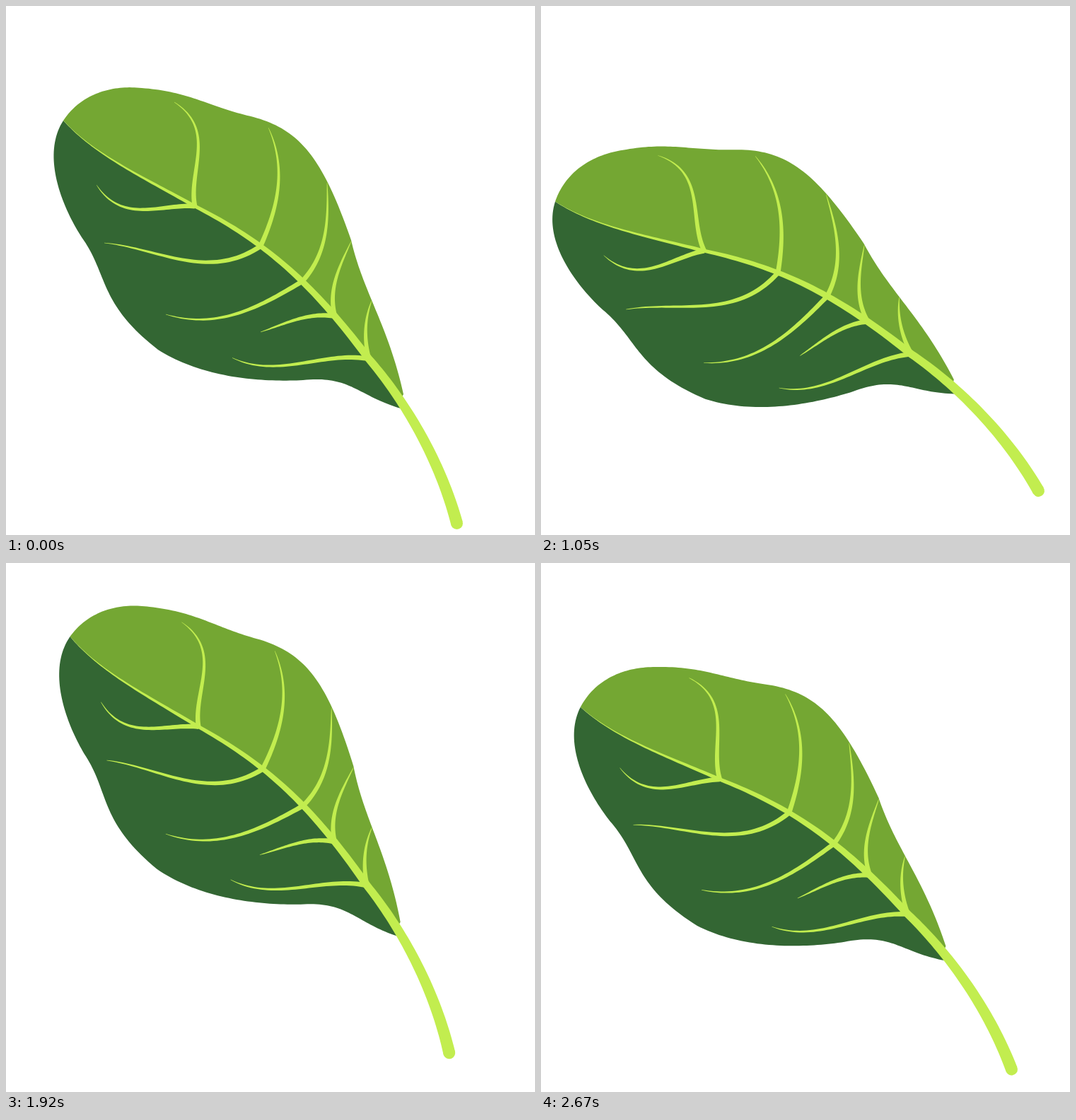
Animation, 748 px wide and 748 px high, one loop 2700 ms. Source, as an HTML page with a canvas:

```html
<!DOCTYPE html>
<html lang="en">
<head>
<meta charset="utf-8">
<title>Drifting leaf</title>
<style>
  html, body { margin: 0; width: 100%; height: 100%; overflow: hidden; background: #fff; }
  canvas { display: block; }
</style>
</head>
<body>
<canvas id="stage" width="748" height="748"></canvas>
<script>
const ctx = document.getElementById('stage').getContext('2d');
const LIGHT = '#74a733', DARK = '#336633', LIME = '#c2ed4f';
const LOOP = 2700, STEP = 30, SWAY = 1402;
const PIVOT = { x: 304.5, y: 430 };
const DETAIL = 40;

const mix = (a, b, u) => a + (b - a) * u;

// Samples a chain of cubic Béziers: a start point, then six numbers per piece.
function chain(start, ...pieces) {
  const line = [start];
  let [x0, y0] = start;
  for (const [x1, y1, x2, y2, x3, y3] of pieces) {
    for (let k = 1; k <= DETAIL; k++) {
      const u = k / DETAIL, v = 1 - u;
      const at = (a, b, c, d) => a * v ** 3 + 3 * b * u * v * v + 3 * c * u * u * v + d * u ** 3;
      line.push([at(x0, x1, x2, x3), at(y0, y1, y2, y3)]);
    }
    [x0, y0] = [x3, y3];
  }
  return line;
}

function polygon(points) {
  const path = new Path2D();
  points.forEach(([x, y]) => path.lineTo(x, y));
  path.closePath();
  return path;
}

// Outline around a line; widthAt gets the progress from 0 to 1.
function ribbon(line, widthAt) {
  const last = line.length - 1, left = [], right = [];
  line.forEach(([x, y], i) => {
    const p = line[Math.max(i - 1, 0)], q = line[Math.min(i + 1, last)];
    const scale = widthAt(i / last) / 2 / Math.hypot(q[0] - p[0], q[1] - p[1]);
    const nx = (p[1] - q[1]) * scale, ny = (q[0] - p[0]) * scale;
    left.push([x + nx, y + ny]);
    right.unshift([x - nx, y - ny]);
  });
  return polygon([...left, ...right]);
}

const rib = chain([81, 162],
  [125, 210, 190, 240, 267, 283],
  [365, 333, 430, 388, 513, 499],
  [563, 557, 613, 640, 637.5, 731.5]);
const ribAt = t => rib[Math.round(t * DETAIL)];
const bladeRib = rib.slice(0, 2.3 * DETAIL + 1).reverse();

const upper = chain([81, 162],
  [104, 127, 145, 111, 192, 116],
  [260, 121, 285, 142, 350, 157],
  [415, 175, 447, 213, 488, 331],
  [505, 405, 540, 450, 562, 549]);
const lower = chain([81, 162],
  [50, 210, 78, 282, 107, 327],
  [145, 380, 130, 420, 215, 486],
  [278, 526, 360, 532, 420, 529],
  [487, 522, 497, 551, 558, 569]);

// A vein leaves the rib at t and bows sideways near its root and near its tip.
function vein(t, tipX, tipY, rootBow, tipBow) {
  const [x, y] = ribAt(t);
  const dx = tipX - x, dy = tipY - y, len = Math.hypot(dx, dy);
  const control = (u, bow) => [x + dx * u - dy / len * bow, y + dy * u + dx / len * bow];
  const line = chain([x, y], [...control(1 / 3, rootBow), ...control(2 / 3, tipBow), tipX, tipY]);
  return ribbon(line, u => 0.4 + 6.4 * (1 - u) ** 0.7);
}

const lightHalf = polygon([...upper, ...bladeRib]);
const darkHalf = polygon([...lower, ...bladeRib]);
const stalk = ribbon(rib, u => 17 * u ** 1.1);
const stalkEnd = new Path2D();
stalkEnd.arc(...rib[rib.length - 1], 8.5, 0, 2 * Math.PI);

const veins = [
  vein(1, 238, 136, 0, 52), vein(1, 128, 253, -7, -47),
  vein(1.36, 371, 172, 21, 30), vein(1.36, 139, 335, -52, -5),
  vein(1.6, 454, 250, 26, 14), vein(1.6, 226, 436, -21, -39),
  vein(1.8, 488, 333, -18, -8), vein(1.8, 360, 461, 14, 4),
  vein(2, 517, 417, -8, -9), vein(2, 320, 497.5, 11, -30)
];

// Linear keys: share of the sway, turn in degrees, vertical shift.
const keys = [[0, 0, 0], [0.33, 5, -66], [0.66, -20, 66], [1, 0, 0]];

function pose(time) {
  const share = time % SWAY / SWAY;
  const next = keys.findIndex(key => share < key[0]);
  const a = keys[next - 1], b = keys[next];
  const u = (share - a[0]) / (b[0] - a[0]);
  return [mix(a[1], b[1], u), mix(a[2], b[2], u)];
}

function fill(color, ...paths) {
  ctx.fillStyle = color;
  paths.forEach(path => ctx.fill(path));
}

function draw(time) {
  const [turn, shift] = pose(time);
  ctx.clearRect(0, 0, 748, 748);
  ctx.save();
  ctx.translate(PIVOT.x, PIVOT.y + shift);
  ctx.rotate(turn * Math.PI / 180);
  ctx.translate(-PIVOT.x, -PIVOT.y);
  fill(DARK, darkHalf);
  fill(LIGHT, lightHalf);
  fill(LIME, stalk, stalkEnd, ...veins);
  ctx.restore();
}

const start = performance.now();
function tick() {
  const time = (performance.now() - start) % LOOP;
  draw(Math.floor(time / STEP) * STEP);
  requestAnimationFrame(tick);
}
tick();
</script>
</body>
</html>
```
